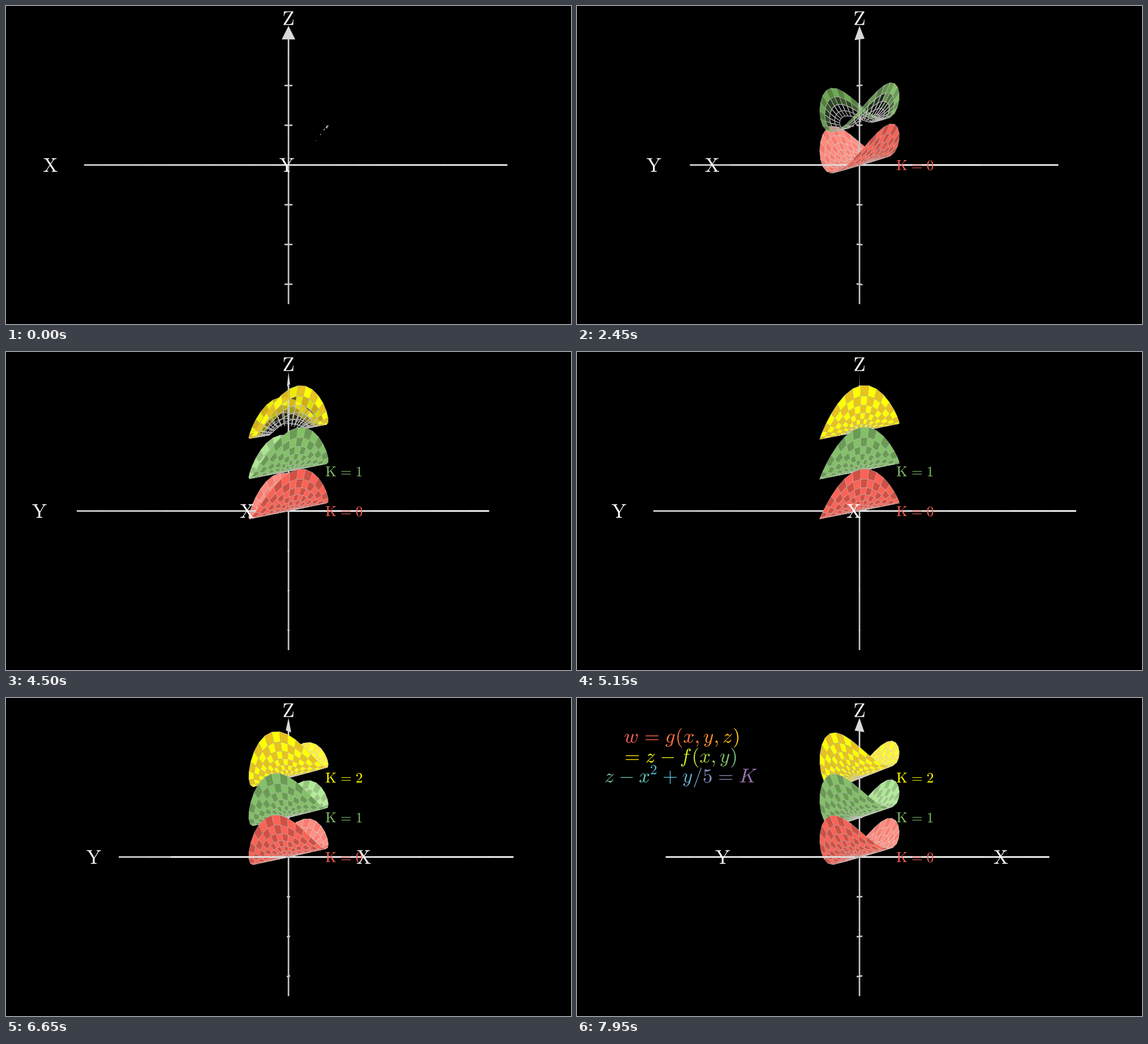
Write a matplotlib script that moves like this. It is 997 px wide and 561 px high and loops after 8000 ms.

```python
import numpy as np
import matplotlib.pyplot as plt
from matplotlib.animation import FuncAnimation
from matplotlib.collections import PolyCollection
from matplotlib.colors import to_rgb
from matplotlib.patches import PathPatch
from matplotlib.textpath import TextPath
from matplotlib.transforms import Affine2D

W, H, DPI = 997, 561, 64
UNIT = H / 8                 # pixels per world unit
PT = 72 / DPI                # points per pixel
CAMERA = 20                  # camera distance
SUN = np.array([-7.0, -9.0, 10.0])
SPIN = 0.3                   # radians per second
DRAW_TIME = 2                # seconds to draw one surface
FORMULA_TIME = 7
RINGS, SECTORS = 16, 32
EM = 35

RED, ORANGE, YELLOW = "#FC6255", "#FF862F", "#FFFF00"
GREEN, BLUE, PURPLE = "#83C167", "#58C4DD", "#9A72AC"
LEVELS = [("#CF5044", RED), ("#699C52", GREEN), ("#E8C11C", YELLOW)]
GREY = np.array(to_rgb("#BBBBBB"))

plt.rcParams["mathtext.fontset"] = "cm"
plt.rcParams["toolbar"] = "None"

fig = plt.figure(figsize=(W / DPI, H / DPI), dpi=DPI, facecolor="black")
ax = fig.add_axes([0, 0, 1, 1])
ax.set_xlim(0, W)
ax.set_ylim(0, H)
ax.axis("off")


# ---------- geometry ----------

def surface(level):
    """Corners of every cell of z = x^2 - y/5 + level over the unit disk."""
    u = np.linspace(-1, 1, RINGS + 1)
    v = np.linspace(0, 2 * np.pi, SECTORS + 1)
    r, a = np.meshgrid(u, v, indexing="ij")
    x, y = r * np.cos(a), r * np.sin(a)
    p = np.stack([x, y, x**2 - y / 5 + level], axis=-1)
    quads = np.stack([p[:-1, :-1], p[1:, :-1], p[1:, 1:], p[:-1, 1:]], axis=2)
    return quads.reshape(-1, 4, 3)


def normalize(v):
    return v / np.linalg.norm(v, axis=-1, keepdims=True)


def shade(points, normals):
    """Brightness added by the sun."""
    f = 0.5 * np.sum(normals * normalize(SUN - points), axis=-1) ** 3
    return np.where(f < 0, f / 2, f)


ring, sector = np.divmod(np.arange(RINGS * SECTORS), SECTORS)
# The disk is swept twice; each early cell is later covered by its twin.
twin = (RINGS - 1 - ring) * SECTORS + (sector + SECTORS // 2) % SECTORS
early = ring < RINGS // 2
odd = (ring + sector) % 2

surfaces = []
for level, pair in enumerate(LEVELS):
    quads = surface(level)
    normals = normalize(np.cross(quads[:, 2] - quads[:, 0],
                                 quads[:, 3] - quads[:, 1]))
    glow = shade(quads.mean(axis=1), normals)[:, None]
    base = np.array([to_rgb(c) for c in pair])[odd]
    surfaces.append((quads, np.clip(base + glow, 0, 1),
                     np.clip(GREY + glow, 0, 1)))


def axis_parts():
    """Lines and the arrow head as (points, grey, line width, filled)."""
    parts = []
    for k in range(3):
        lo, hi = (-3.5, 3.16) if k == 2 else (-5.5, 5.15)
        ends = np.linspace(lo, hi, 21)
        for a, b in zip(ends[:-1], ends[1:]):
            line = np.zeros((2, 3))
            line[:, k] = a, min(b + 0.02, hi)
            if k == 2:
                grey = 0.76 + 0.01 * a
            else:
                grey = GREY[0] + shade(line[0], np.array([0, 0, 1]))
            parts.append((line, min(grey, 1), 2.8, False))
    for z in (-3, -2, -1, 1, 2):
        tick = np.array([[-0.1, 0, z], [0.1, 0, z]])
        parts.append((tick, 0.8, 2.6, False))
    tip = np.array([[-0.17, 0, 3.16], [0.17, 0, 3.16], [0, 0, 3.5]])
    parts.append((tip, 0.85, 0, True))
    return parts


AXES = axis_parts()


def project(p, theta):
    """World points to screen pixels and depth towards the camera."""
    c, s = np.cos(theta), np.sin(theta)
    depth = p[..., 0] * c + p[..., 1] * s
    k = UNIT * CAMERA / (CAMERA - depth)
    sx = W / 2 + k * (p[..., 1] * c - p[..., 0] * s)
    sy = H / 2 + k * p[..., 2]
    return np.stack([sx, sy], axis=-1), depth


def outline(quad, part):
    """The first part (0 to 1) of a cell's border."""
    loop = np.vstack([quad, quad[:1]])
    if part >= 1:
        return loop
    n = int(4 * part)
    end = loop[n] + (4 * part - n) * (loop[n + 1] - loop[n])
    return np.vstack([loop[:n + 1], end])


# ---------- text ----------

def glyph(tex, x, y, color, size=EM, centred=False):
    path = TextPath((0, 0), f"${tex}$", size=size)
    box = path.get_extents()
    if centred:
        x -= (box.x0 + box.x1) / 2
        y += (box.y0 + box.y1) / 2
    elif tex == "=":
        x += 0.056 * size - box.x0   # drop the padding mathtext adds
    path = path.transformed(Affine2D().translate(x, H - y))
    patch = PathPatch(path, facecolor=color, lw=0, zorder=5)
    ax.add_patch(patch)
    return patch


def rainbow(t):
    stops = np.array([to_rgb(c) for c in (RED, ORANGE, YELLOW, GREEN, BLUE, PURPLE)])
    grid = np.linspace(0, 1, len(stops))
    return [np.interp(t, grid, stops[:, k]) for k in range(3)]


# Glyph advances in em
ADVANCE = {"w": 0.743, "g": 0.513, "x": 0.572, "y": 0.526, "z": 0.509,
           "f": 0.598, "K": 0.92, "(": 0.389, ")": 0.389, ",": 0.445,
           "=": 0.778, "-": 0.778, "+": 0.778, "/": 0.5, "5": 0.5, "2": 0.4}
SPACE = {"=": 0.278, "-": 0.222, "+": 0.222}
LINES = [("w=g(x,y,z)", 83, 79), ("=z-f(x,y)", 84, 114), ("z-x2+y/5=K", 48.5, 149)]


def formula():
    out = []
    total = sum(len(s) for s, _, _ in LINES)
    for text, x, y in LINES:
        for k, ch in enumerate(text):
            pad = SPACE.get(ch, 0) * EM
            x += pad if k else 0
            raised = ch == "2"
            out.append(glyph(ch, x, y - (0.413 * EM if raised else 0),
                             rainbow(len(out) / (total - 1)),
                             EM * (0.7 if raised else 1)))
            x += ADVANCE[ch] * EM + pad
    return out


def level_label(k):
    color, size, y = LEVELS[k][1], 25.3, 289.5 - k * UNIT
    return [glyph(t, 563.5 + dx * size, y, color, size)
            for t, dx in ((r"\mathrm{K}", 0), ("=", 1.056), (str(k), 2.112))]


# Each group shows from its start time on
timed = [(DRAW_TIME * (k + 1), level_label(k)) for k in range(3)]
timed.append((FORMULA_TIME, formula()))

glyph(r"\mathrm{Z}", 498.5, 21.5, "white", centred=True)
movers = [(glyph(r"\mathrm{%s}" % s, 0, H, "white", centred=True), np.array(p))
          for s, p in (("X", [6.0, 0, 0]), ("Y", [0, 6.0, 0]))]

scene = PolyCollection([], closed=False, zorder=1, capstyle="butt",
                       joinstyle="round", snap=False)
ax.add_collection(scene)


# ---------- animation ----------

def clock(frame):
    """Scene time; a sixtieth of a second is lost whenever a new part starts."""
    t = frame * 0.05
    return t + (1 - sum(t >= start for start, _ in timed)) / 60


def cell_progress(time):
    n = RINGS * SECTORS
    lag = 4 / n
    return np.clip(time / DRAW_TIME * (1 + (n - 1) * lag) - lag * np.arange(n), 0, 1)


def draw(frame):
    now = clock(frame)
    theta = np.pi / 2 + SPIN * now
    items = []               # depth, points, face, edge, line width

    for pts, grey, lw, filled in AXES:
        xy, depth = project(pts, theta)
        rgb = (grey,) * 3
        items.append((depth.mean(), xy, (*rgb, float(filled)),
                      (*rgb, float(not filled)), lw))

    for k, (quads, faces, edges) in enumerate(surfaces):
        done = cell_progress(now - DRAW_TIME * k)
        if done[0] <= 0:
            continue
        fill = np.clip(2 * done - 1, 0, 1)
        widths = 1.4 + (0.45 - 1.4) * fill
        xy, depth = project(quads, theta)
        depth = depth.mean(axis=1)
        shown = (done > 0) & ~(early & (fill[twin] >= 1))
        for i in np.flatnonzero(shown):
            items.append((depth[i], outline(xy[i], 2 * done[i]),
                          (*faces[i], fill[i]), (*edges[i], 1), widths[i]))

    items.sort(key=lambda it: round(it[0], 6))
    _, verts, face, edge, lw = zip(*items)
    scene.set_verts(verts, closed=False)
    scene.set_facecolor(face)
    scene.set_edgecolor(edge)
    scene.set_linewidth([w * PT for w in lw])

    for patch, pos in movers:
        (x, y), _ = project(pos, theta)
        patch.set_transform(Affine2D().translate(x, y) + ax.transData)
    for start, group in timed:
        for patch in group:
            patch.set_visible(frame * 0.05 >= start)
    return [scene]


anim = FuncAnimation(fig, draw, frames=160, interval=50, repeat=True,
                     repeat_delay=0, init_func=lambda: draw(0), blit=False)
plt.show()
```
